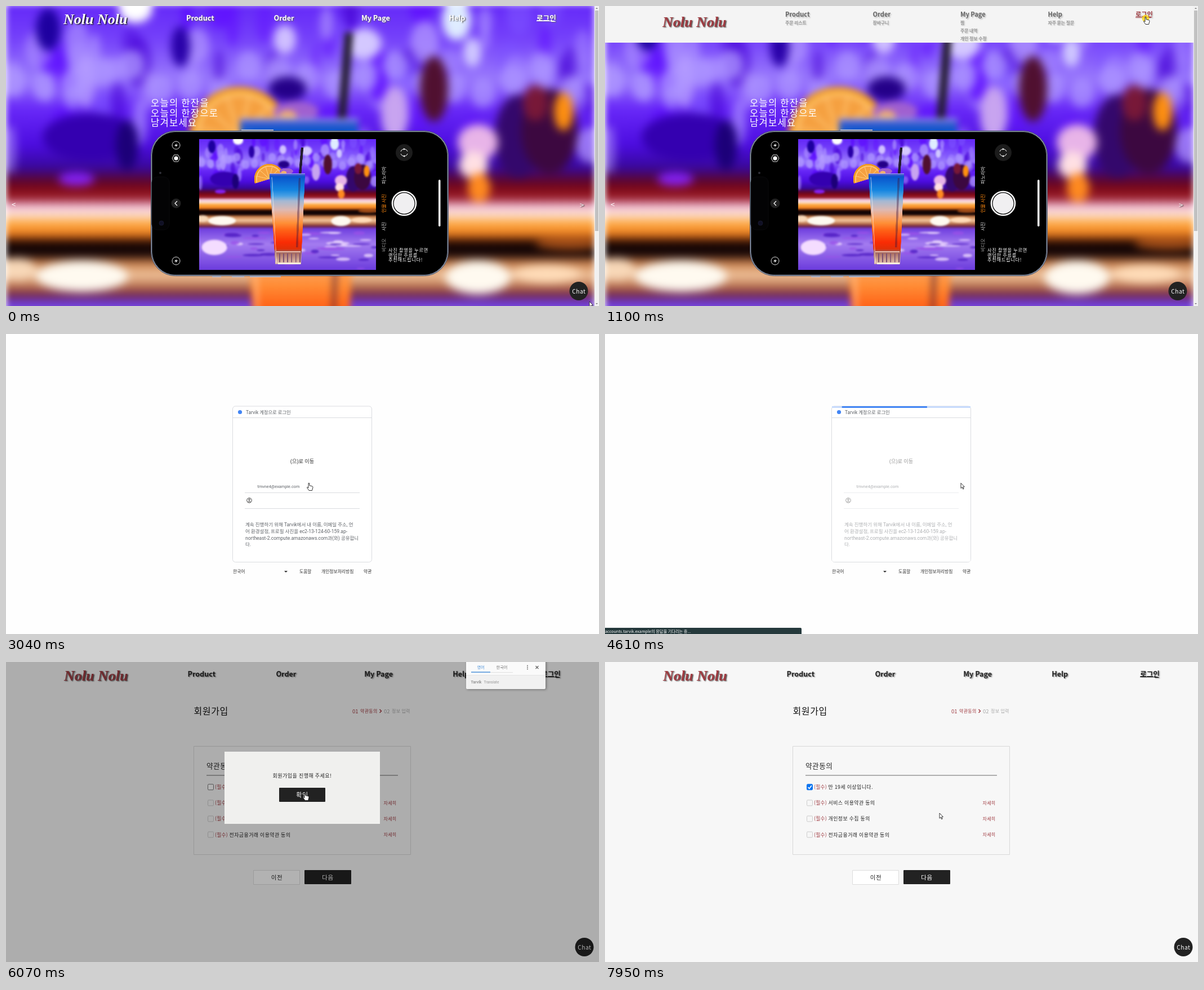
An HTML page with a canvas that plays this animation: 1053 px wide and 532 px high, repeating every 7990 ms.

```html
<!DOCTYPE html>
<html lang="ko">
<head>
<meta charset="utf-8">
<title>Nolu Nolu</title>
<style>
html, body { margin: 0; width: 100%; height: 100%; overflow: hidden; background: #fff; }
canvas { display: block; }
</style>
</head>
<body>
<canvas id="stage" width="1053" height="532"></canvas>
<script>
const W = 1053, H = 532, LOOP = 7990;
const SANS = '"Noto Sans CJK KR", "Noto Sans", sans-serif';
const ROBOTO = 'Roboto, "Noto Sans CJK KR", sans-serif';
const RED = '#a03c42', INK = '#222';
const stage = document.getElementById('stage').getContext('2d');
let ctx = stage;

const clamp = v => Math.max(0, Math.min(1, v));
const smooth = v => v * v * (3 - 2 * v);
const ramp = (t, a, b) => smooth(clamp((t - a) / (b - a)));
const mix = (a, b, k) => a + (b - a) * k;
const gray = v => `rgb(${v},${v},${v})`;

function makeCanvas(w, h) {
  const c = document.createElement('canvas');
  c.width = w;
  c.height = h;
  return c;
}

// y is the vertical middle of the letters
function text(s, x, y, size, color, o = {}) {
  ctx.font = `${o.weight || 400} ${size}px ${o.family || SANS}`;
  ctx.letterSpacing = (o.gap || 0) + 'px';
  ctx.textAlign = o.align || 'left';
  ctx.fillStyle = color;
  if (o.shadow) {
    ctx.shadowColor = o.shadow;
    ctx.shadowBlur = 2;
    ctx.shadowOffsetX = ctx.shadowOffsetY = 1.6;
  }
  ctx.fillText(s, x, y + size * 0.37);
  ctx.shadowColor = 'transparent';
}

const centered = (s, x, y, size, color, gap = 0.6) =>
  text(s, x, y, size, color, { align: 'center', gap });

function box(x, y, w, h, fill, stroke, r = 0) {
  ctx.beginPath();
  ctx.roundRect(x, y, w, h, r);
  if (fill) { ctx.fillStyle = fill; ctx.fill(); }
  if (stroke) { ctx.strokeStyle = stroke; ctx.lineWidth = 1; ctx.stroke(); }
}

function disc(x, y, r, fill, stroke, lw = 1) {
  ctx.beginPath();
  ctx.arc(x, y, r, 0, 7);
  if (fill) { ctx.fillStyle = fill; ctx.fill(); }
  if (stroke) { ctx.strokeStyle = stroke; ctx.lineWidth = lw; ctx.stroke(); }
}

function line(points, color, lw = 1) {
  ctx.beginPath();
  points.forEach(([x, y]) => ctx.lineTo(x, y));
  ctx.strokeStyle = color;
  ctx.lineWidth = lw;
  ctx.stroke();
}

function shape(points, fill, stroke) {
  ctx.beginPath();
  points.forEach(([x, y]) => ctx.lineTo(x, y));
  ctx.closePath();
  ctx.fillStyle = fill;
  ctx.fill();
  if (stroke) { ctx.strokeStyle = stroke; ctx.lineWidth = 0.9; ctx.stroke(); }
}

function vertical(y0, y1, stops) {
  const g = ctx.createLinearGradient(0, y0, 0, y1);
  stops.forEach(([y, color]) => g.addColorStop((y - y0) / (y1 - y0), color));
  return g;
}

function ellipse([x, y, rx, ry, color]) {
  ctx.beginPath();
  ctx.ellipse(x, y, rx, ry, 0, 0, 7);
  ctx.fillStyle = color;
  ctx.fill();
}

function randomizer(seed) {
  return () => (seed = (seed * 16807) % 2147483647) / 2147483647;
}

// Bar scene: soft lights and a layered cocktail
function paintLights() {
  const rnd = randomizer(4127);
  ctx.fillStyle = vertical(0, 773, [
    [0, '#6428f8'], [60, '#7440fa'], [130, '#9878fc'], [185, '#6828f8'],
    [250, '#4c0ce0'], [290, '#38089c'], [312, '#5a0630'], [330, '#860a14'],
    [347, '#a02838'], [357, '#f4c4e0'], [374, '#fbe0d0'], [388, '#ffaa40'],
    [408, '#f08020'], [420, '#3c1004'], [428, '#0c0304'], [446, '#180606'],
    [456, '#c07440'], [480, '#f4c8a0'], [502, '#b46c48'], [516, '#6c2048'],
    [530, '#7040e0'], [620, '#a47cf0'], [773, '#6c3cdc']]);
  ctx.fillRect(0, 0, 1045, 773);
  const purples = ['#a88cff', '#5a08ff', '#4804d8', '#7c50ff', '#b8a0ff', '#6010ff'];
  for (let i = 0; i < 75; i++) {
    ctx.globalAlpha = 0.45 + rnd() * 0.4;
    ellipse([rnd() * 1045, rnd() * 270, 9 + rnd() * 17, 18 + rnd() * 30, purples[Math.floor(rnd() * 6)]]);
  }
  ctx.globalAlpha = 0.75;
  for (let x = 15; x < 1045; x += 52) ellipse([x, 105 + rnd() * 55, 22, 26, '#ac94ff']);
  for (let i = 0; i < 45; i++) {
    ellipse([rnd() * 1045, 550 + rnd() * 220, 20 + rnd() * 55, 4 + rnd() * 7, ['#4a18c0', '#f0dcff', '#9a50e8'][i % 3]]);
  }
  ctx.globalAlpha = 1;
  [
    [75, 45, 22, 38, '#1e00a0'], [310, 75, 17, 36, '#2800a8'], [150, 235, 85, 42, '#3400b0'],
    [215, 250, 20, 45, '#1c0078'], [500, 150, 34, 22, '#240088'], [910, 235, 42, 75, '#34086c'],
    [965, 225, 50, 75, '#3c0840'], [760, 150, 25, 58, '#501030'], [940, 175, 22, 32, '#781838'],
    [230, 8, 30, 25, '#fff'], [800, 28, 26, 36, '#dfecff'], [495, 62, 20, 26, '#d0c0ff'],
    [635, 70, 32, 28, '#d4c8ff'], [828, 85, 16, 26, '#d0c8ff'], [690, 195, 24, 50, '#c8a4f0'],
    [990, 190, 17, 34, '#ff9010'], [838, 245, 36, 32, '#e8b4e8'], [830, 285, 26, 24, '#ffe0e4'],
    [840, 325, 20, 26, '#ff8a20'], [125, 310, 32, 12, '#8420f0'], [135, 482, 82, 28, '#fffaf0'],
    [20, 470, 34, 20, '#f8d8b8'], [838, 484, 58, 30, '#fffaf0'], [960, 478, 62, 17, '#ffdcb8'],
    [1000, 425, 60, 10, '#a04c18'], [90, 640, 75, 45, '#f4dcff']
  ].forEach(ellipse);
}

function paintDrink() {
  line([[609, 50], [594, 230]], '#241c30', 15);
  ctx.save();
  ctx.translate(415, 236);
  ctx.rotate(-0.3);
  for (const [r, color] of [[90, '#f09a20'], [80, '#ffc470'], [73, '#f5a040']]) {
    ctx.beginPath();
    ctx.arc(0, 0, r, Math.PI, 0);
    ctx.fillStyle = color;
    ctx.fill();
  }
  for (let a = 1; a < 6; a++) {
    const k = Math.PI * (1 + a / 6);
    line([[0, 0], [73 * Math.cos(k), 73 * Math.sin(k)]], '#ffc470', 4);
  }
  ctx.restore();
  ellipse([515, 190, 40, 18, '#a060d0']);
  ellipse([500, 198, 16, 10, '#f0b070']);
  shape([[415, 203], [626, 203], [602, 738], [450, 738]], vertical(203, 740, [
    [203, '#6064d0'], [222, '#0a54cc'], [300, '#1484e0'], [335, '#48a0e4'], [365, '#a4b8d4'],
    [420, '#e0b8b0'], [460, '#f8a470'], [495, '#ff9038'], [535, '#ff6418'], [610, '#fa2c04'],
    [650, '#e03008'], [665, '#a06058'], [740, '#e8c8b4']]));
  line([[594, 230], [578, 640]], 'rgba(60,20,60,.4)', 12);
  line([[415, 204], [626, 204]], '#a0a0f0', 4);
  line([[430, 225], [456, 730]], 'rgba(255,255,255,.35)', 6);
  line([[457, 665], [600, 665]], '#f8d8c8', 6);
  line([[465, 735], [598, 735]], '#fff0e0', 8);
  for (let x = 475; x < 600; x += 24) line([[x, 675], [x, 728]], '#7c5070', 6);
}

function paintBar() {
  const lights = makeCanvas(1045, 773), bar = makeCanvas(1045, 773);
  ctx = lights.getContext('2d');
  paintLights();
  ctx = bar.getContext('2d');
  ctx.drawImage(lights, 0, 0);
  ctx.filter = 'blur(6px)';
  ctx.drawImage(lights, 0, 0);
  ctx.filter = 'none';
  paintDrink();
  return bar;
}

function bolt(x, y) {
  disc(x, y, 7, null, '#ddd');
  shape([[x + 1.5, y - 4], [x - 3, y + 1], [x, y + 1], [x - 1, y + 4], [x + 3, y - 1], [x, y - 1]], '#eee');
}

function sideways(s, y, color) {
  ctx.save();
  ctx.translate(671, y);
  ctx.rotate(-Math.PI / 2);
  text(s, 0, 0, 8.5, color, { align: 'center', weight: 500 });
  ctx.restore();
}

function paintPhone(bar) {
  [[418, 219], [433, 479], [366, 479], [401, 479]].forEach(([x, y], i) =>
    box(x, y, [57, 55, 16, 22][i], 2, '#b8bcd0'));
  box(257.5, 221.5, 528, 257, '#9aa4b8', '#4a5262', 43);
  box(259.5, 223.5, 524, 253, '#000', '#2a2e38', 41);
  box(259, 303, 31, 94, '#030304', '#0a0a0d', 10);
  disc(274, 296, 2, '#303038');
  disc(276, 385, 4, '#101024', '#181830');
  ctx.drawImage(bar, 343, 236, 314, 232);
  bolt(302, 247);
  bolt(302, 452);
  shape([0, 1, 2, 3, 4, 5].map(i => [302 + 7 * Math.cos(i * Math.PI / 3), 270 + 7 * Math.sin(i * Math.PI / 3)]), '#111', '#eee');
  disc(302, 270, 3.6, '#fff');
  disc(302, 350, 8.5, '#222');
  line([[304, 346], [300, 350], [304, 354]], '#fff', 1.2);
  disc(707, 260, 15, '#1c1c1c');
  for (const a of [0.3, 3.44]) {
    ctx.beginPath();
    ctx.arc(707, 260, 6.3, a, a + 2.5);
    ctx.strokeStyle = '#fff';
    ctx.lineWidth = 1;
    ctx.stroke();
  }
  shape([[706, 252], [709, 253.8], [706, 255.6]], '#fff');
  shape([[708, 264.4], [705, 266.2], [708, 268]], '#fff');
  disc(707, 350, 21, null, '#fff', 2.6);
  disc(707, 350, 18.5, '#f0eff1');
  box(768, 308, 3.5, 83, '#fff', null, 2);
  sideways('파노라마', 300, '#ddd');
  sideways('인물 사진', 350, '#ff8a10');
  sideways('사진', 391, '#ddd');
  sideways('비디오', 424, '#999');
  ['사진 촬영을 누르면', '랜덤한 주류를', '추천해드립니다!'].forEach((s, i) =>
    text(s, 679, 433 + i * 8.7, 8.2, '#fff', { gap: 0.7 }));
}

function paintHero() {
  const hero = makeCanvas(W, H), bar = paintBar();
  ctx = hero.getContext('2d');
  ctx.fillStyle = '#fff';
  ctx.fillRect(0, 0, W, H);
  ctx.filter = 'blur(6px)';
  ctx.drawImage(bar, 0, -3);
  ctx.filter = 'none';
  ['오늘의 한잔을', '오늘의 한장으로', '남겨보세요'].forEach((s, i) =>
    text(s, 257, 172 + i * 17.6, 16.6, '#fff', { weight: 300, gap: 1.2 }));
  paintPhone(bar);
  text('<', 10, 352, 13, '#fff');
  text('>', 1019, 353, 13, '#fff', { shadow: '#333' });
  box(1045, 0, 8, H, '#f1f1f1');
  box(1046, 8, 6, 391, '#c1c1c1');
  shape([[1047, 5], [1049, 3], [1051, 5]], '#777');
  shape([[1047, 527], [1049, 529], [1051, 527]], '#777');
  chat(1017);
  ctx = stage;
  return hero;
}

function chat(x) {
  disc(x, 505.5, 16.5, INK);
  centered('Chat', x + 0.3, 506, 10.2, '#fff', 0.5);
}

const MENU = [
  ['Product', '주문 리스트'], ['Order', '장바구니'],
  ['My Page', '찜', '주문 내역', '개인 정보 수정'], ['Help', '자주 묻는 질문'], ['로그인']
];

function logo(x, y, color) {
  text('Nolu Nolu', x, y, 26, color, {
    weight: 'italic 700', family: '"Liberation Serif", serif', shadow: color === '#fff' ? '#111' : '#444'
  });
}

// open: 0 is the resting bar, 1 the unfolded menu
function menu(x0, step, open, color, loginColor, shadow) {
  MENU.forEach(([title, ...items], i) => {
    const x = x0 + step * i, y = 21 - 6 * open, size = 12.6 - 1.5 * open;
    const tint = i === 4 ? loginColor : color;
    text(title, x, y, size, tint, { weight: 900, shadow });
    if (i === 4) line([[x, y + 5.5], [x + size * 2.5, y + 5.5]], tint);
    const seen = clamp((open - 0.7) / 0.3);
    if (!seen) return;
    ctx.save();
    ctx.globalAlpha *= seen;
    items.forEach((s, j) => text(s, x, 30 + j * 14, 7.8, '#999', { weight: 700, shadow: '#ccc' }));
    ctx.restore();
  });
}

function homePage(t) {
  ctx.drawImage(hero, 0, 0);
  const open = ramp(t, 760, 1080);
  if (open) box(0, 0, 1045, 65 * open, '#f4f4f4');
  const dark = gray(Math.round(mix(255, 100, open)));
  logo(102, 22 + 5 * open, open > 0.4 ? RED : '#fff');
  menu(320, 155.5, open, dark, open > 0.6 ? RED : dark, open > 0.5 ? '#bbb' : '#666');
}

function plainPage(open, menuAlpha = 1) {
  box(0, 0, W, H, '#f7f7f7');
  logo(103, 23 + 4 * open, RED);
  ctx.globalAlpha = menuAlpha;
  menu(322.5, 156.9, open, INK, open > 0.3 ? RED : INK, '#888');
  ctx.globalAlpha = 1;
  chat(1027);
}

function provider(y, label, fill, color, mark, square) {
  box(394.5, y + 0.5, 263, 36, fill, fill === '#fff' ? '#ddd' : fill);
  line([[430.5, y], [430.5, y + 36]], '#ddd');
  if (square) box(404, y + 10, 17, 17, mark);
  else disc(412.5, y + 18.5, 9.5, mark);
  centered(label, 544, y + 18.5, 10, color, 0.8);
}

function loginPage(t) {
  plainPage(1 - ramp(t, 1310, 2040));
  text('로그인', 361, 87, 16, '#111', { gap: 0.6 });
  box(360.5, 122.5, 330, 352, '#fdfdfd', '#e0e0e0');
  text('회원 로그인', 394, 156, 12.5, INK, { gap: 0.8 });
  box(394.5, 173.5, 172, 23, '#fff', '#bbb');
  box(394.5, 202.5, 172, 23, '#fff', '#bbb');
  text('이메일', 401, 185, 9, '#777', { gap: 0.4 });
  text('비밀번호', 401, 214, 9, '#777', { gap: 0.4 });
  box(584, 173, 74, 53, INK, null, 1);
  centered('로그인', 621, 200, 10.5, '#fff', 0.8);
  provider(254, '타빅으로 시작하기', '#fff', INK, '#4285f4');
  provider(302, '루모나로 시작하기', '#07c95c', '#fff', '#fff', true);
  provider(349, '포로롱챗으로 시작하기', '#ffe900', INK, '#111');
  line([[394, 402.5], [658, 402.5]], '#bbb');
  box(394, 418, 82, 29, INK, null, 1);
  centered('회원가입', 435.5, 433, 10.5, '#fff');
  box(485.5, 419.5, 81, 27, '#fff', '#ddd');
  centered('이메일 찾기', 526.5, 433, 8.8, INK, 0.8);
  box(575.5, 419.5, 82, 27, '#fff', '#ddd');
  centered('비밀번호 찾기', 617, 433, 8.8, INK, 0.8);
}

function accountPage(t) {
  const body = (s, x, y, size, color = '#5f6368') => text(s, x, y, size, color, { family: ROBOTO });
  box(0, 0, W, H, '#fefefe');
  box(402.5, 128, 247, 276.5, '#fff', '#dadce0', 5);
  line([[403, 148.5], [649, 148.5]], '#dadce0');
  disc(415.5, 138.5, 3.6, '#4285f4');
  body('Tarvik 계정으로 로그인', 426, 138.5, 8.3);
  text('(으)로 이동', 526, 226, 9.2, '#333', { align: 'center', family: ROBOTO });
  body('tmvne4@example.com', 446.5, 270, 7.3);
  line([[424, 281.5], [628, 281.5]], '#dadce0');
  line([[424, 309.5], [628, 309.5]], '#dadce0');
  disc(432, 295, 4.3, null, '#444');
  disc(432, 293.8, 1.4, null, '#444');
  line([[429.3, 298], [432, 296.8], [434.7, 298]], '#444');
  ['계속 진행하기 위해 Tarvik에서 내 이름, 이메일 주소, 언',
    '어 환경설정, 프로필 사진을 ec2-13-124-60-159.ap-',
    'northeast-2.compute.amazonaws.com과(와) 공유합니', '다.'
  ].forEach((s, i) => body(s, 425, 338 + i * 11.7, 8.5));
  const fade = ramp(t, 4180, 4320);
  if (fade) {
    box(403, 149, 246, 255, `rgba(255,255,255,${0.5 * fade})`);
    box(403, 128, 246, 3, '#c6dafc');
    const p = ((Math.min(t, 5310) - 4180) % 1130) / 1130;
    const a = 403 + 246 * clamp(p * 1.5 - 0.5), b = 403 + 246 * clamp(p * 1.8);
    box(a, 128, b - a, 3, '#4285f4');
  }
  body('한국어', 403, 421, 7.8, '#333');
  shape([[494, 420], [500, 420], [497, 423]], '#333');
  body('도움말', 521, 421, 7.8, '#333');
  body('개인정보처리방침', 560, 421, 7.8, '#333');
  body('약관', 635, 421, 7.8, '#333');
}

const TERMS = ['만 19세 이상입니다.', '서비스 이용약관 동의', '개인정보 수집 동의', '전자금융거래 이용약관 동의'];

function signupPage(t) {
  plainPage(0, ramp(t, 5455, 5600));
  text('회원가입', 333.5, 87, 16, '#111', { gap: 0.6 });
  text('01', 615, 87.5, 9.5, RED);
  text('약관동의', 629, 87, 8, RED, { gap: 0.3 });
  line([[663.5, 84], [666.5, 87], [663.5, 90]], RED, 1.5);
  text('02', 671, 87.5, 9.5, '#aaa');
  text('정보 입력', 685, 87, 8, '#aaa', { gap: 0.3 });
  box(333.5, 149.5, 385, 192, null, '#d8d8d8');
  text('약관동의', 356, 184, 12.6, INK, { gap: 0.5 });
  line([[356, 201], [696, 201]], '#666');
  TERMS.forEach((s, i) => {
    const y = 222 + i * 28.1, checked = !i && t >= 7560;
    box(358.5, y - 5.2, 10, 10, checked ? '#0b74f0' : i ? '#f6f6f6' : '#fff', checked ? '#0b74f0' : i ? '#ccc' : '#767676', 1.5);
    if (checked) line([[360.5, y], [362.8, y + 2.4], [366.8, y - 3]], '#fff', 1.7);
    text('(필수)', 371, y, 8.8, RED, { gap: 0.2 });
    text(s, 396.5, y, 8.9, INK, { gap: 0.5 });
    if (i) text('자세히', 670.5, y, 8, RED, { gap: 0.3 });
  });
  box(439.5, 369.5, 82, 25, '#fff', '#ddd');
  centered('이전', 481, 382, 10.5, INK);
  box(530, 369, 83, 25, INK, null, 1);
  centered('다음', 571.5, 382, 10.5, '#fff');
  if (t < 6750) {
    box(0, 0, W, H, 'rgba(0,0,0,.3)');
    box(388, 159, 276, 128, '#f0f0ee');
    centered('회원가입을 진행해 주세요!', 526, 202, 9, INK, 0.5);
    box(485, 223, 82, 25, INK, null, 1);
    centered('확인', 526, 236, 11, '#fff');
  }
  const shown = mix(0.2, 1, ramp(t, 5450, 5600)) * (1 - ramp(t, 6860, 7040));
  if (shown > 0) translator(shown);
}

function translator(alpha) {
  ctx.save();
  ctx.globalAlpha = alpha;
  const scale = mix(0.975, 1, alpha);
  ctx.translate(887.5, 0);
  ctx.scale(scale, 1);
  ctx.translate(-887.5, 0);
  ctx.shadowColor = 'rgba(0,0,0,.35)';
  ctx.shadowBlur = 4;
  ctx.shadowOffsetY = 1;
  box(817, -4, 141, 52, '#f1f1f1', null, 2);
  ctx.shadowColor = 'transparent';
  box(817, 0, 141, 23, '#fafafa');
  line([[817, 23.5], [958, 23.5]], '#e4e4e4');
  centered('영어', 843, 9.5, 7.2, '#4a90d9', 0);
  centered('한국어', 880.5, 9.5, 7.2, '#777', 0);
  line([[826, 18], [860, 18]], '#4a90d9', 1.4);
  line([[860, 18.5], [900, 18.5]], '#e0e0e0');
  for (const y of [6.5, 9.5, 12.5]) disc(926, y, 0.9, '#666');
  line([[940.5, 7], [945.5, 12]], '#666', 1.3);
  line([[945.5, 7], [940.5, 12]], '#666', 1.3);
  text('Tarvik', 825.5, 35.5, 7, '#888', { weight: 500, family: ROBOTO });
  text('Translate', 848.5, 35.5, 6.5, '#999', { family: ROBOTO });
  ctx.restore();
}

function statusBar() {
  box(0, 521, 349, 11, '#25393c', null, [0, 2, 0, 0]);
  text('accounts.tarvik.example의 응답을 기다리는 중...', 0, 527, 7.2, '#fff');
}

// Pointer stops: time, x, y
const PATH = [
  [330, 1038, 495], [760, 975, 60], [1000, 960, 19], [1280, 960, 19], [1530, 713, 220],
  [1900, 640, 328], [2040, 538, 264], [3800, 538, 264], [3870, 562, 265], [4170, 562, 265],
  [4900, 669, 264], [5740, 669, 264], [6070, 531, 232], [6730, 531, 232], [6800, 541, 245],
  [7000, 541, 245], [7490, 361, 219], [7600, 361, 219], [7950, 594, 268]
];
const HAND_TIMES = [[960, 1300], [2330, 3840], [6000, 6750]];

function pointerAt(t) {
  if (t < 60) return [1036, 524];
  if (t < 330) return null;
  const i = PATH.findIndex(p => p[0] > t);
  if (i < 0) return PATH[PATH.length - 1].slice(1);
  if (i === 0) return PATH[0].slice(1);
  const [a, b] = [PATH[i - 1], PATH[i]];
  const k = ramp(t, a[0], b[0]);
  return [mix(a[1], b[1], k), mix(a[2], b[2], k)];
}

function pointer(t) {
  const spot = pointerAt(t);
  if (!spot) return;
  const [x, y] = spot;
  const place = points => points.map(([dx, dy]) => [x + dx, y + dy]);
  if (t >= 1050 && t < 1240) disc(x, y + 3, 6.5, 'rgba(250,215,20,.8)');
  if (HAND_TIMES.some(([a, b]) => t >= a && t < b)) {
    shape(place([[-1, 0.5], [0.7, 0.5], [1, 4.8], [6, 6], [7, 7.5], [6.2, 11], [5.5, 13.5],
      [0, 13.5], [-3.5, 8.5], [-3, 7.3], [-1, 9]]), '#fff', '#222');
  } else {
    shape(place([[0, 0], [0, 9.2], [2.2, 7.3], [3.8, 10.8], [5.2, 10.1], [3.7, 6.8], [6.4, 6.6]]), '#fff', '#222');
  }
}

function draw(t) {
  ctx.clearRect(0, 0, W, H);
  if (t < 1300) homePage(t);
  else if (t < 3040) loginPage(t);
  else if (t < 5450) accountPage(t);
  else signupPage(t);
  if (t >= 4300 && t < 5900) statusBar();
  pointer(t);
}

const hero = paintHero();
const start = performance.now();
function tick() {
  draw((performance.now() - start) % LOOP);
  requestAnimationFrame(tick);
}
tick();
</script>
</body>
</html>
```
